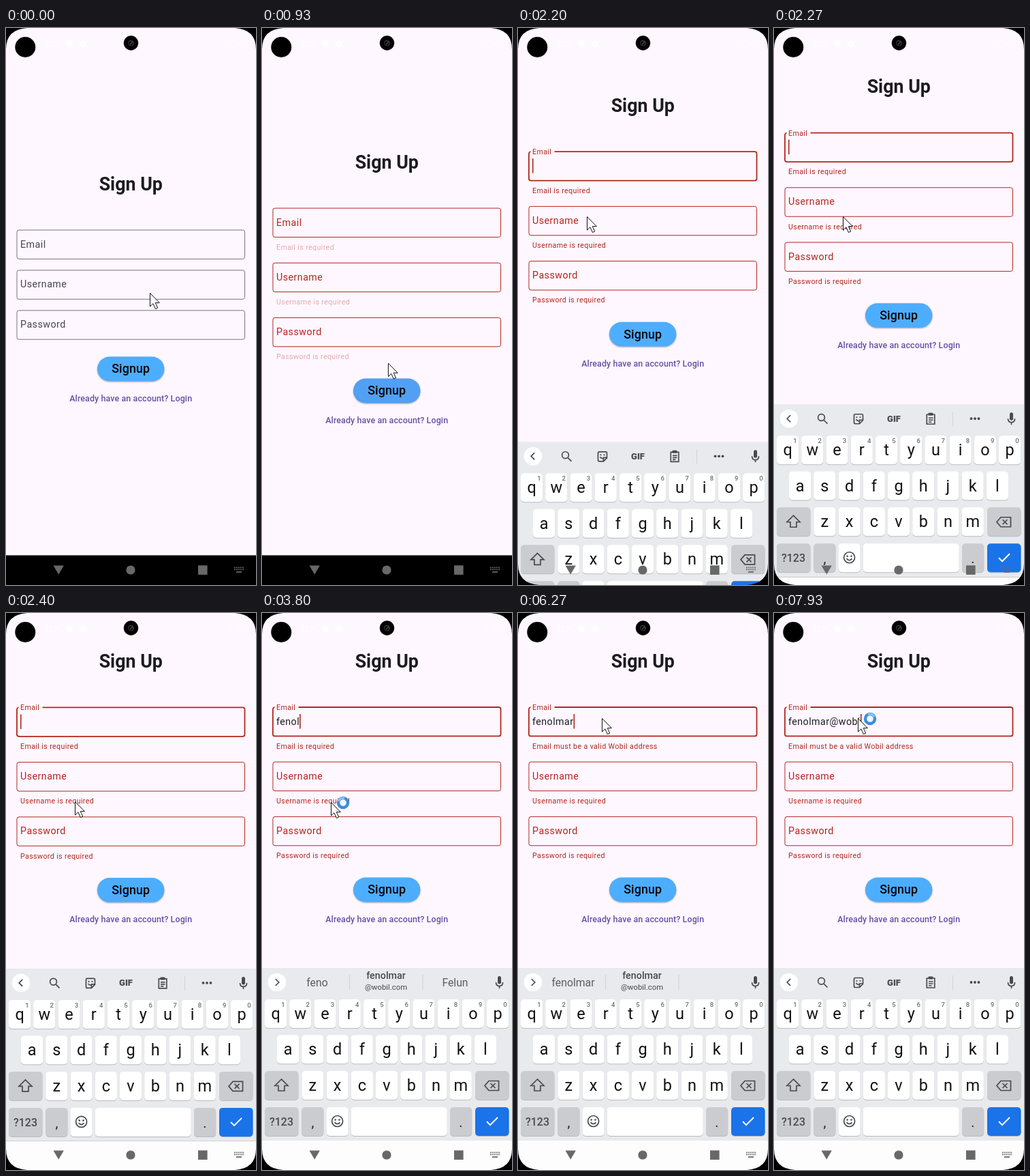
Write an HTML page that moves like this. It is 367 by 816 pixels and loops after 8 s.

```html
<!DOCTYPE html>
<html lang="en">
<head>
<meta charset="utf-8">
<title>Sign up form</title>
<style>
html, body { margin: 0; width: 100%; height: 100%; overflow: hidden; background: #000; }
svg { display: block; width: 367px; height: 816px; font-family: Roboto, sans-serif; }
text { white-space: pre; }
.body { font-size: 14.29px; letter-spacing: .446px; }
.error { font-size: 10.71px; letter-spacing: .357px; fill: #b3261e; }
.mid { text-anchor: middle; }
.line { fill: none; stroke: #474a4e; stroke-width: 1.7; }
.hint { font-size: 9.5px; font-weight: 500; fill: #6b6e73; }
.key { font-size: 23.5px; fill: #111; }
.word { font-size: 15.8px; fill: #5a5d62; }
</style>
</head>
<body>
<svg id="stage" viewBox="0 0 367 816"></svg>
<script>
const LOOP = 8000;
const RED = '#b3261e', BG = '#fef7ff', INK = '#1d1b20', GREY = '#474a4e';
const NAME = 'fenolmar', TYPED = NAME + '@wobi';
const stage = document.getElementById('stage');

function el(tag, attrs, parent = stage, text) {
  const node = document.createElementNS('http://www.w3.org/2000/svg', tag);
  set(node, attrs);
  if (text !== undefined) node.textContent = text;
  parent.appendChild(node);
  return node;
}
function set(node, attrs) {
  for (const k in attrs) node.setAttribute(k, attrs[k]);
}
const group = (parent, attrs = {}) => el('g', attrs, parent);
const rect = (p, x, y, width, height, fill, rx = 0) => el('rect', { x, y, width, height, fill, rx }, p);
const circle = (p, cx, cy, r, fill) => el('circle', { cx, cy, r, fill }, p);
const label = (p, x, y, text, attrs) => el('text', { x, y, ...attrs }, p, text);
const line = (p, d, attrs) => el('path', { d, class: 'line', ...attrs }, p);
const show = (node, on) => set(node, { visibility: on ? 'visible' : 'hidden' });
const move = (node, x, y) => set(node, { transform: `translate(${x} ${y})` });
const clamp = v => Math.max(0, Math.min(1, v));
const mix = (a, b, p) => a + (b - a) * p;
const smooth = p => p * p * (3 - 2 * p);

// Cubic bezier (.2, 0, 0, 1): x is inverted by bisection.
function emphasize(x) {
  let lo = 0, hi = 1;
  for (let i = 0; i < 24; i++) {
    const s = (lo + hi) / 2;
    if (.6 * s * (1 - s) ** 2 + s ** 3 < x) lo = s; else hi = s;
  }
  return smooth(lo);
}

// Form
rect(stage, 0, 0, 367, 816, BG);
const status = group(stage, { fill: '#fff' });
label(status, 57, 27, '12:30', { 'font-size': 10 });
circle(status, 93, 23, 5, '#fff');
circle(status, 113, 23, 5, '#fff');
label(status, 321, 27, '5G 80%', { 'font-size': 10 });

const form = group(stage);
const title = label(form, 183.3, 205.5, 'Sign Up', { class: 'mid', 'font-size': 26.8, 'font-weight': 700, fill: INK });
const fields = ['Email', 'Username', 'Password'].map(name => {
  const g = group(form);
  const box = el('rect', { x: 16, y: 0, width: 334.5, height: 42.4, rx: 3, fill: 'none' }, g);
  const gap = rect(g, 18.5, -2, 35, 4, BG);
  const tag = label(g, 0, 0, name, { class: 'body' });
  const error = label(g, 21, 60.8, name + ' is required', { class: 'error' });
  return { g, box, gap, tag, error };
});
const email = fields[0];
const entry = label(email.g, 21, 25.5, '', { class: 'body', fill: INK });
const caret = rect(email.g, 21, 10, 1.6, 21.5, RED);

const actions = group(form);
const button = rect(actions, 134, 513.6, 98.4, 35.8, '#4dadff', 17.9);
button.style.filter = 'drop-shadow(0 1px 1px rgba(0,0,0,.35))';
const press = rect(actions, 134, 513.6, 98.4, 35.8, '#6750a4', 17.9);
label(actions, 183.2, 537.4, 'Signup', { class: 'mid', 'font-size': 17.86, 'font-weight': 500, 'letter-spacing': .09 });
label(actions, 183.2, 579, 'Already have an account? Login',
  { class: 'mid', 'font-size': 12.5, 'font-weight': 500, 'letter-spacing': .09, fill: '#6750a4' });

rect(stage, 0, 772.5, 367, 44, '#000');

// Keyboard
const board = group(stage);
rect(board, 0, 520, 367, 253, '#e8eaed');
rect(board, 0, 773, 367, 300, '#fdfdfd');

function key(x, y, w, fill) {
  rect(board, x, y + 1, w, 42, '#b9bbc0', 5);
  rect(board, x, y, w, 42, fill, 5);
}
const PITCH = 36.22, SOFT = '#cbccd0';
[['qwertyuiop', 4, 566], ['asdfghjkl', 22, 618.3], ['zxcvbnm', 58.3, 671]].forEach(([chars, x0, y], row) => {
  [...chars].forEach((c, i) => {
    const x = x0 + i * PITCH;
    key(x, y, 32.2, '#fff');
    label(board, x + 16.1, y + 29, c, { class: 'mid key' });
    if (!row) label(board, x + 27, y + 11, (i + 1) % 10, { class: 'mid hint' });
  });
});
key(4, 671, 49.5, SOFT);
key(313, 671, 49.5, SOFT);
key(4, 724, 49.5, SOFT);
key(58.3, 724, 32.2, SOFT);
key(94.5, 724, 32.2, '#fff');
key(130.8, 724, 141, '#fff');
key(276, 724, 32.2, SOFT);
key(313, 724, 49.5, '#1a73e8');
label(board, 28.5, 751, '?123', { class: 'mid', 'font-size': 16, 'font-weight': 500, fill: GREY });
label(board, 74.4, 753, ',', { class: 'mid', 'font-size': 20, fill: '#222' });
label(board, 292, 753, '.', { class: 'mid', 'font-size': 20, fill: '#222' });
line(board, 'M28.5 683l-9.5 9.5h5v7.5h9v-7.5h5z');
line(board, 'M333 685.5h14.5v14H333l-6-7zM335.5 689l7 7m0-7l-7 7');
line(board, 'M330 745l5 5 11-11', { style: 'stroke:#fff;stroke-width:2' });
function smiley(x, y, r) {
  for (const dx of [-.36, .36]) circle(board, x + dx * r, y - .25 * r, 1.3, GREY);
  line(board, `M${x - .5 * r} ${y + .2 * r}q${.5 * r} ${.6 * r} ${r} 0`);
}
el('circle', { cx: 110.6, cy: 744.5, r: 8, class: 'line' }, board);
smiley(110.6, 744.5, 8);

// Strip above the keys
circle(board, 22, 541, 13.3, '#fff');
const chevron = line(board, '');
line(board, 'M343.5 541q0 5.5 5 5.5t5-5.5M348.5 546v4');
rect(board, 346, 532, 5, 11.5, GREY, 2.5);

const tools = group(board);
el('circle', { cx: 69.5, cy: 539.3, r: 4.9, class: 'line' }, tools);
line(tools, 'M73 543l5.5 5.5', { 'stroke-width': 2 });
line(tools, 'M119.5 534.5h9q2 0 2 2v7l-5 5h-6q-2 0-2-2v-10q0-2 2-2zM130 543h-4.5v5M120.5 542q2 3 4.5 2');
circle(tools, 121.5, 539, 1.1, GREY);
circle(tools, 126.5, 539, 1.1, GREY);
label(tools, 176, 545.5, 'GIF', { class: 'mid', 'font-size': 13, 'font-weight': 900, fill: GREY });
line(tools, 'M224.3 535h11.5v14h-11.5zM227 540h6.5m-6.5 3h6.5m-6.5 3h4.5');
rect(tools, 226.5, 532.5, 7, 4, GREY, 1);
rect(tools, 262, 531, 1, 21, '#d0d2d6');
for (const x of [289.5, 295, 300.5]) circle(tools, x, 541, 1.9, GREY);

const guesses = group(board);
const guess = label(guesses, 81, 547, '', { class: 'mid word' });
label(guesses, 182, 536, NAME, { class: 'mid', 'font-size': 14.3, 'font-weight': 500, fill: GREY });
label(guesses, 182, 552, '@wobil.com', { class: 'mid', 'font-size': 11.3, fill: GREY });
const extra = label(guesses, 283.5, 547, 'Felun', { class: 'mid word' });
for (const x of [128, 235.5]) rect(guesses, x, 530, 1, 22, '#d0d2d6');

// System buttons, screen corners, camera
const nav = group(stage, { fill: '#686868' });
el('path', { d: 'M69.5 787.5h15.4l-7.7 13z' }, nav);
el('circle', { cx: 183, cy: 794, r: 6.6 }, nav);
el('rect', { x: 282, y: 787.3, width: 13.6, height: 13.6 }, nav);
for (let i = 0; i < 10; i++)
  el('rect', { x: 335 + i % 5 * 3, y: 789.5 + (i > 4) * 3, width: 1.8, height: 1.8 }, nav);
el('rect', { x: 338, y: 796, width: 8, height: 1.8 }, nav);
el('path', {
  d: 'M0 0H367V816H0zM31 0Q0 2 0 31V785Q0 814 31 816H336Q367 814 367 785V31Q367 2 336 0z',
  'fill-rule': 'evenodd'
});
circle(stage, 183.5, 22, 10.7, '#000');
circle(stage, 183.5, 22, 4.6, '#2b2b2d');
circle(stage, 183, 22.5, 2.8, '#0c0c0e');
line(stage, 'M182 24l4-4', { style: 'stroke:#666;stroke-width:1' });
circle(stage, 28.3, 28, 15, '#000');

// Mouse pointer with busy ring
const pointer = group(stage);
el('path', {
  d: 'M.5.5V20l4.4-4.2 3.6 7.7 3.2-1.5-3.4-7.4h6z', fill: '#fff', stroke: '#111', 'stroke-width': 1
}, pointer);
const busy = group(pointer);
circle(busy, 18, 1, 9.2, '#3a8de0');
circle(busy, 18, 1, 4.8, '#f2f8ff');
const glint = el('path', { d: 'M18 -6a7 7 0 0 1 7 7', fill: 'none', stroke: '#8cc4f7', 'stroke-width': 3 }, busy);

// Timing
const ERROR_AT = 870, FOCUS_AT = 1910;
const KEY_TIMES = [3200, 3470, 3600, 3700, 3790, 3930, 4070, 4200, 6730, 7330, 7470, 7670, 7870];
const CARET_RESETS = [FOCUS_AT, ...KEY_TIMES, 6270];
const PATH = [
  [0, 211, 388], [400, 187, 496], [870, 187, 496], [1530, 100, 274], [2000, 100, 274],
  [2130, 101, 276], [3400, 101, 276], [3470, 101, 277], [4700, 101, 277], [4870, 101, 293],
  [5060, 101, 293], [5070, 112, 405], [5200, 145, 424], [5330, 165, 402], [5470, 168, 398],
  [5700, 168, 398], [6200, 123, 154], [LOOP, 123, 154]
];
const typedBy = t => KEY_TIMES.filter(k => k <= t).length;

function pointerAt(t) {
  const i = PATH.findIndex(p => p[0] > t);
  const [t0, x0, y0] = PATH[i - 1], [t1, x1, y1] = PATH[i];
  const p = smooth((t - t0) / (t1 - t0));
  return [mix(x0, x1, p), mix(y0, y1, p)];
}
function pressAt(t) {
  const age = [t - 800, t - 5530].find(a => a >= 0 && a < 330);
  return age === undefined ? 0 : .14 * Math.sin(Math.PI * age / 330);
}

function draw(t) {
  const failed = t >= ERROR_AT;
  const rise = 252 * emphasize(clamp((t - 2111) / 322));
  const float = smooth(clamp((t - 1935) / 167));
  const count = typedBy(t);

  move(form, 0, -rise / 2);
  move(title, 0, failed ? 0 : 32);
  move(actions, 0, failed ? 0 : -32);
  fields.forEach((f, i) => {
    move(f.g, 0, failed ? 264 + i * 80.2 : 296 + i * 58.9);
    set(f.box, { stroke: failed ? RED : '#79747e', 'stroke-width': 1 });
    set(f.tag, { fill: failed ? RED : '#49454f', transform: 'translate(21 25.5)' });
    set(f.error, { opacity: clamp((t - ERROR_AT) / 167) });
    show(f.gap, false);
  });
  set(email.box, { 'stroke-width': 1 + .8 * float });
  set(email.tag, { transform: `translate(21 ${mix(25.5, 4, float)}) scale(${mix(1, .75, float)})` });
  set(email.gap, { width: 35 * float });
  show(email.gap, float > 0);
  email.error.textContent = t < 5600 ? 'Email is required' : 'Email must be a valid Wobil address';
  set(press, { opacity: pressAt(t) });

  entry.textContent = TYPED.slice(0, count);
  set(entry, { 'text-decoration': t >= 4200 && t < 6250 ? 'underline' : 'none' });
  const last = Math.max(...CARET_RESETS.filter(r => r <= t));
  set(caret, { x: 21 + (count ? entry.getComputedTextLength() : 0) });
  show(caret, t >= FOCUS_AT && Math.floor((t - last) / 500) % 2 === 0);

  move(board, 0, 252 - rise);
  show(board, rise > 0);
  const guessing = t >= 3300 && t < 6800;
  set(tools, { display: guessing ? 'none' : 'inline' });
  set(guesses, { display: guessing ? 'inline' : 'none' });
  set(chevron, { d: guessing ? 'M19.8 536l5 5-5 5' : 'M24.2 536l-5 5 5 5' });
  guess.textContent = NAME.slice(0, Math.max(1, typedBy(t - 90)));
  show(extra, guessing && t < 4270);

  move(pointer, ...pointerAt(t));
  show(busy, (t >= 3470 && t < 4270) || t >= 7530);
  set(glint, { transform: `rotate(${t * .36 % 360} 18 1)` });
}

const start = performance.now();
function tick() {
  draw((performance.now() - start) % LOOP);
  requestAnimationFrame(tick);
}
tick();
</script>
</body>
</html>
```
